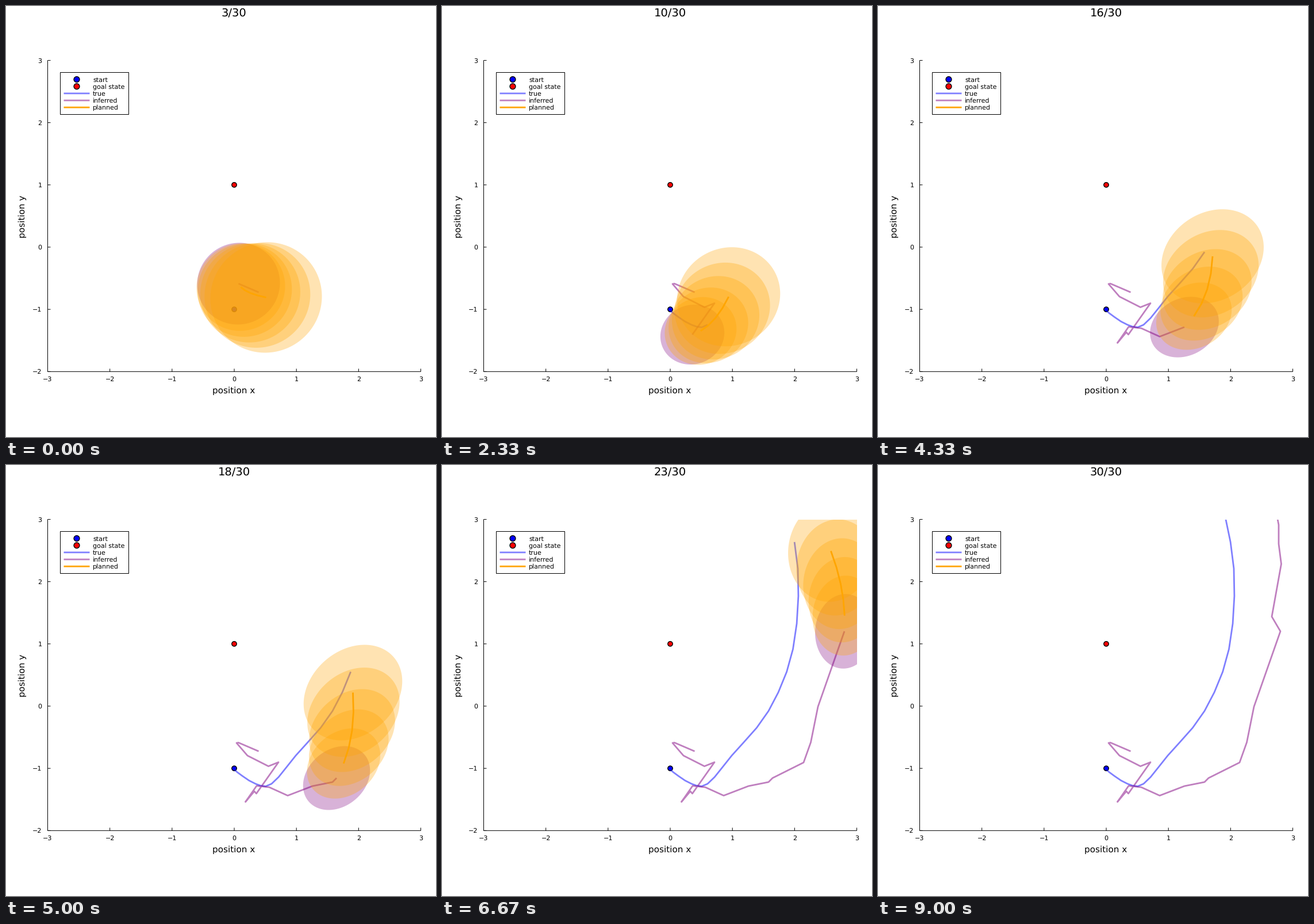
These frames come from a looping animation (748x749 px, 9.33 s). A matplotlib script:

```python
import numpy as np
import matplotlib.pyplot as plt
from matplotlib.animation import FuncAnimation
from matplotlib.patches import Circle, Polygon, Rectangle

plt.rcParams["font.family"] = "DejaVu Sans"
plt.rcParams["text.hinting"] = "none"

W, H, DPI = 748, 749, 100
LOOP_MS, TICK_MS = 9330, 30
FIRST, LAST = 3, 30
HORIZON = 5
PX = 72 / DPI  # points per pixel
LEFT, TOP, UNIT = 72.5, 94.5, 108.17
RIGHT, BOTTOM = LEFT + 6 * UNIT, TOP + 5 * UNIT

# Knots of the smooth true path, three steps apart
TRUE_KNOTS = [(397, 527.5), (402.5, 534), (434, 554), (462, 554), (504, 505),
              (568, 427.5), (610.5, 320), (619, 180), (594, 42)]

# Turning points of the inferred path by step
TURNS = {1: (439.5, 497.5), 3: (404.5, 482.5), 4: (401, 483), 5: (420, 505),
         7: (456.5, 523.5), 8: (474, 516.5), 10: (435.5, 571), 11: (432, 567),
         12: (416.5, 585.5), 13: (436, 557.5), 14: (458, 560), 15: (490, 574.5),
         16: (533, 558), 17: (568, 551), 18: (575, 544), 19: (629, 517),
         20: (641.5, 482), 21: (654, 420), 23: (700, 289), 24: (685, 263.5),
         25: (701.5, 172), 26: (697, 137), 27: (697, 104), 30: (676, -5)}

# Planned motion by step: velocity x, y and acceleration x, y
PLAN = {3: (2.6, 6.3, 1.4, -0.3), 7: (19.6, 2.4, -1.6, -1.8),
        8: (14.5, -1, -1, -1.7), 13: (15.3, -10.1, 0.4, -1.7),
        16: (18.3, -17.6, -1.7, -1.4), 20: (9.6, -30.8, -1.6, -0.8),
        26: (-6.5, -23.5, -0.9, 0.5)}


def blend(keys, steps):
    """Linear interpolation between the key rows."""
    return np.transpose([np.interp(steps, list(keys), col)
                         for col in zip(*keys.values())])


def spline(knots, parts):
    """Catmull-Rom curve with a given number of parts per span."""
    p = np.array(knots, float)
    p = np.vstack([2 * p[0] - p[1], p, 2 * p[-1] - p[-2]])
    points = []
    for a, b, c, d in zip(p, p[1:], p[2:], p[3:]):
        for t in np.arange(parts) / parts:
            points.append(b + t / 2 * (c - a + t * (2 * a - 5 * b + 4 * c - d
                                                    + t * (3 * b - a - 3 * c + d))))
    return np.array(points + [p[-2]])


TRUE = spline(TRUE_KNOTS, 3)
INFERRED = blend(TURNS, np.arange(1, LAST + 1))
ANGLE = np.linspace(0, 2 * np.pi, 160)


def belief(step):
    """Half extents, tilt and growth per planned step of the uncertainty."""
    settle = np.exp((FIRST - step) / 1.2)
    rx = 54 + 6 * np.cos((step - 15) / 12 * np.pi) + 24 * settle
    ry = 58.5 + 6.5 * np.tanh((step - 19) / 2) + 19 * settle
    tilt = np.interp(step, [8, 20, 26], [0.02, 0.28, -0.2])
    growth = np.interp(step, [3, 7, 26], [5, 7.3, 4.2])
    return np.array([rx, ry]), tilt, growth


def ellipse(center, radii, tilt):
    """Covariance ellipse with the given half extents and correlation."""
    x = center[0] + radii[0] * np.cos(ANGLE)
    y = center[1] - radii[1] * np.sin(ANGLE + np.arcsin(tilt))
    return np.column_stack([x, y])


fig = plt.figure(figsize=(W / DPI, H / DPI), dpi=DPI, facecolor="white")
ax = fig.add_axes([0, 0, 1, 1])
ax.set(xlim=(0, W), ylim=(H, 0))
ax.axis("off")

plot_area = Rectangle((LEFT, TOP), RIGHT - LEFT, BOTTOM - TOP,
                      transform=ax.transData)


def line(x, y, color="black", width=1.0, **kw):
    return ax.plot(x, y, color=color, lw=width * PX, solid_capstyle="butt",
                   solid_joinstyle="round", snap=False, **kw)[0]


def label(x, y, text, size, ha="center", **kw):
    return ax.text(x, y, text, fontsize=size, ha=ha, va="baseline", **kw)


def dot(x, y, r, color, z):
    ax.add_patch(Circle((x, y), r, fc=color, ec="black", lw=1.4 * PX, zorder=z))


def curve(color, alpha, z):
    art = line([], [], color, 2.78, alpha=alpha, zorder=z)
    art.set_clip_path(plot_area)
    return art


def blob(color, z):
    art = Polygon(np.zeros((3, 2)), fc=color, ec="none", lw=0, alpha=0.3, zorder=z)
    ax.add_patch(art)
    art.set_clip_path(plot_area)
    return art


def draw_axes():
    line([LEFT, RIGHT], [BOTTOM, BOTTOM])
    line([LEFT, LEFT], [TOP, BOTTOM])
    for v in range(-3, 4):
        x, name = LEFT + (v + 3) * UNIT, str(v).replace("-", "\u2212")
        line([x, x], [BOTTOM, BOTTOM - 5])
        label(x, 652, name, 8)
        if v > -3:
            y = TOP + (3 - v) * UNIT
            line([LEFT, LEFT + 5], [y, y])
            label(62.5, y + 4, name, 8, "right")
    label(396.5, 672.5, "position x", 11)
    label(33, 366, "position y", 11, rotation=90, rotation_mode="anchor")


def draw_legend():
    ax.add_patch(Rectangle((94.5, 115.5), 119, 73, fc="white", ec="black",
                           lw=PX, snap=False, zorder=20))
    names = ["start", "goal state", "true", "inferred", "planned"]
    colors = ["blue", "red", "blue", "purple", "orange"]
    for i, (name, color) in enumerate(zip(names, colors)):
        y = 127.6 + 12.15 * i
        if i < 2:
            dot(123, y, 4.9, color, 21)
        else:
            line([100.5, 145.5], [y, y], color, 2.78, zorder=21,
                 alpha=1 if color == "orange" else 0.5)
        label(151, y + 4, name, 8, "left", zorder=21)


draw_axes()
draw_legend()
dot(397, BOTTOM - UNIT, 4.2, "blue", 3)
dot(397, TOP + 2 * UNIT, 4.2, "red", 3)
title = label(396.5, 17, "", 14)
true_line = curve("blue", 0.5, 4)
inferred_line = curve("purple", 0.5, 5)
inferred_blob = blob("purple", 6)
plan_line = curve("orange", 1, 7)
plan_blobs = [blob("orange", 8 + k) for k in range(HORIZON)]


def draw(i):
    # Each step appears in the tick during which it falls due
    step = FIRST + int((i + 1) * TICK_MS * (LAST - FIRST + 1) / LOOP_MS)
    step = min(step, LAST)
    center = INFERRED[step - 1]
    radii, tilt, growth = belief(step)
    motion = blend(PLAN, step)
    ahead = np.arange(1, HORIZON + 1)[:, None]
    plan = center + motion[:2] * ahead + motion[2:] * ahead ** 2

    title.set_text(f"{step}/{LAST}")
    true_line.set_data(*TRUE[:step].T)
    inferred_line.set_data(*INFERRED[:step].T)
    inferred_blob.set_xy(ellipse(center, radii, tilt))
    plan_line.set_data(*plan.T)
    for k, art in enumerate(plan_blobs):
        art.set_xy(ellipse(plan[k], radii + growth * (k + 1), tilt))
    return [title, true_line, inferred_line, inferred_blob, plan_line, *plan_blobs]


anim = FuncAnimation(fig, draw, frames=LOOP_MS // TICK_MS, interval=TICK_MS,
                     init_func=lambda: draw(0), repeat=True, repeat_delay=0,
                     blit=False)
plt.show()
```
